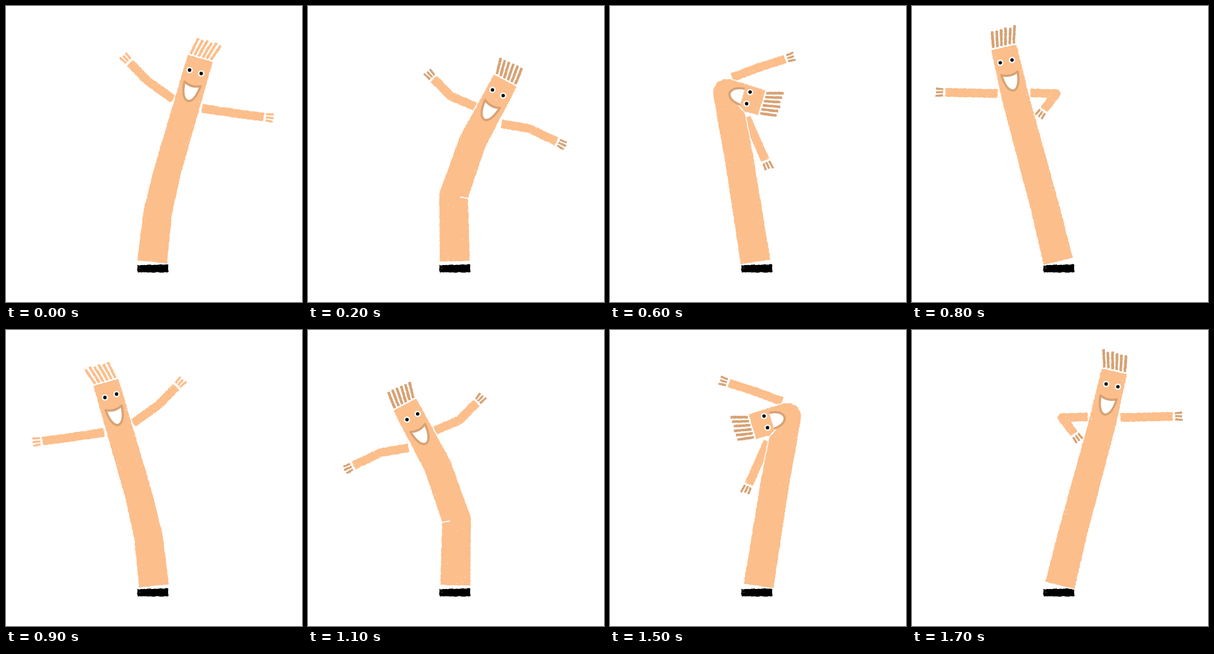
An HTML page with a canvas that plays this animation: 480 px wide and 480 px high, repeating every 1.8 s.

```html
<!DOCTYPE html>
<html lang="en">
<head>
<meta charset="utf-8">
<title>Tube dancer</title>
<style>
html, body { margin: 0; width: 100%; height: 100%; overflow: hidden; background: #fff; }
canvas { display: block; width: 100vw; height: 100vh; }
</style>
</head>
<body>
<canvas id="stage" width="480" height="480"></canvas>
<script>
const ctx = document.getElementById('stage').getContext('2d');
const SKIN = '#fcbe8b', DARK = '#d7a274';
const STEP = 100, HALF = 9, AXIS = 477;

// A pose is a spine from base to crown, two arms from shoulder to wrist,
// and the sideways sway of the hair tips.
const pose = (spine, armL, armR, sway) => ({ spine, armL, armR, sway });

const lean = pose([237,415, 246,335, 262,267, 315,85],
  [271,151, 229,121, 201,92], [318,166, 385,176, 418,180], 7);
const buckle = pose([238,414, 236,308, 267,220, 320,121],
  [271,163, 231,146, 204,118], [314,191, 360,199, 403,220], -5);
const bow = pose([237,415, 224,315, 215,222, 323,181],
  [254,178, 249,141, 214,147], [277,221, 328,238, 369,255], 1);
const droop = pose([236,415, 209,245, 189,140, 246,157],
  [198,116, 243,99, 284,86], [221,181, 237,217, 252,250], -6);
const rise = pose([237,414, 211,280, 178,150, 197,82],
  [150,136, 132,96, 112,56], [206,160, 234,186, 231,215], 0);
const stand = pose([237,414, 214,320, 168,150, 149,67],
  [139,142, 95,141, 54,140], [192,141, 234,142, 214,168], 6);

const mean = (a, b) => Array.isArray(a) ? a.map((v, i) => mean(v, b[i])) : (a + b) / 2;
const between = (a, b) =>
  pose(mean(a.spine, b.spine), mean(a.armL, b.armL), mean(a.armR, b.armR), mean(a.sway, b.sway));

const dip = { ...between(bow, droop), armL: [228,150, 238,118, 246,92] };
const poses = [lean, between(lean, buckle), buckle, between(buckle, bow), bow, dip, droop, rise, stand];

let seed = 1;
function rnd() {
  seed = (seed * 16807) % 2147483647;
  return seed / 2147483647;
}
const jit = a => (rnd() * 2 - 1) * a;
const pairs = a => Array.from({ length: a.length / 2 }, (_, i) => [a[2 * i], a[2 * i + 1]]);
const lerp = (p, q, t) => [p[0] + (q[0] - p[0]) * t, p[1] + (q[1] - p[1]) * t];
const dist = (p, q) => Math.hypot(q[0] - p[0], q[1] - p[1]);
const heading = (p, q) => Math.atan2(q[1] - p[1], q[0] - p[0]);
const move = (p, h, d) => [p[0] + Math.cos(h) * d, p[1] + Math.sin(h) * d];
const turn = (a, b) => Math.atan2(Math.sin(b - a), Math.cos(b - a));

// Local axes at the end of a limb: (side, ahead) to stage coordinates.
function frameAt(limb) {
  const [p, q] = limb.slice(-2), h = heading(p, q);
  return (side, ahead) => move(move(q, h, ahead), h + Math.PI / 2, side);
}

// Outline of a bent tube with rounded joints, tapering from w0 to w1.
function tube(pts, w0, w1) {
  const left = [], right = [], last = pts.length - 1;
  pts.forEach((p, i) => {
    const a = heading(pts[Math.max(i - 1, 0)], pts[Math.max(i, 1)]);
    const b = i < last ? heading(p, pts[i + 1]) : a;
    const r = (w0 + (w1 - w0) * i / last) / 2;
    for (let t = 0; t <= 1; t += 0.25) {
      const h = a + turn(a, b) * t + Math.PI / 2;
      left.push(move(p, h, -r));
      right.push(move(p, h, r));
    }
  });
  return [...left, ...right.reverse()];
}

// Polygon with a chalky edge; specks is the chance of a bare spot per edge sample.
function crayon(pts, color, { amp = 0.6, halo = 0, specks = 0 } = {}) {
  const path = new Path2D(), dots = [];
  pts.forEach((p, i) => {
    const q = pts[(i + 1) % pts.length], n = Math.ceil(dist(p, q) / 2);
    for (let k = 0; k < n; k++) {
      const [x, y] = lerp(p, q, k / n);
      path.lineTo(x + jit(amp), y + jit(amp));
      if (rnd() < specks) dots.push([x + jit(5), y + jit(5)]);
      if (rnd() < specks / 4) dots.push([x + jit(24), y + jit(5)]);
    }
  });
  path.closePath();
  if (halo) {
    ctx.strokeStyle = '#fff';
    ctx.lineWidth = halo;
    ctx.stroke(path);
  }
  ctx.fillStyle = color;
  ctx.fill(path);
  ctx.save();
  ctx.clip(path);
  ctx.fillStyle = 'rgba(255,255,255,.55)';
  for (const [x, y] of dots) ctx.fillRect(x, y, 0.6 + rnd(), 0.6 + rnd());
  ctx.restore();
}

const stick = (p, q, w, color) => crayon(tube([p, q], w, w), color, { amp: 0.4 });

// Fan of n strands growing from the end of a limb.
function fan(at, n, root, tip, from, to, sway, w, color) {
  for (let i = 0; i < n; i++) {
    const s = 2 * i / (n - 1) - 1;
    stick(at(s * root, from), at(s * tip + sway, to + jit(1.5)), w, color);
  }
}

function arm(flat, color) {
  const pts = pairs(flat);
  crayon(tube(pts, 14, 14), SKIN, { specks: 0.12 });
  fan(frameAt(pts), 3, 5, 6, 3.5, 16, 0, 3.4, color);
}

// White fold running in from the inner corner of every sharp bend.
function creases(pts) {
  for (let i = 1; i < pts.length - 1; i++) {
    const a = heading(pts[i - 1], pts[i]), bend = turn(a, heading(pts[i], pts[i + 1]));
    const size = Math.abs(bend);
    if (size < 0.32) continue;
    const dir = a + bend / 2 + Math.sign(bend) * Math.PI / 2;
    const corner = move(pts[i], dir, 23 / Math.cos(bend / 2));
    stick(corner, move(corner, dir, -8 - 12 * Math.min(1, size)), 1.8, '#fff');
  }
}

function disc([x, y], r, color) {
  ctx.fillStyle = color;
  ctx.beginPath();
  ctx.arc(x, y, r, 0, 7);
  ctx.fill();
}

// The mouth is squeezed when the head folds over short.
function face(at, room) {
  const chin = Math.min(72, room - 5), lip = chin * 0.6, squeezed = chin < 60;
  const path = new Path2D();
  path.moveTo(...at(13, -lip));
  path.quadraticCurveTo(...at(11, -chin * 0.97), ...at(0, -chin));
  path.quadraticCurveTo(...at(-12, -chin * 0.97), ...at(-14, -lip));
  if (!squeezed) {
    path.quadraticCurveTo(...at(0, -lip - 7), ...at(13, -lip));
    path.closePath();
  }
  ctx.fillStyle = '#fff';
  ctx.fill(path);
  ctx.strokeStyle = DARK;
  ctx.lineWidth = 3.6;
  ctx.lineJoin = 'round';
  ctx.stroke(path);
  for (const side of [-11.3, 8.3]) {
    disc(at(side, -23), 5.2, '#fff');
    disc(at(side, -23), 2.8, '#000');
  }
}

function draw(step) {
  const i = step % HALF, p = poses[i], spine = pairs(p.spine), head = frameAt(spine);
  const tint = p === lean ? SKIN : DARK;
  ctx.setTransform(1, 0, 0, 1, 0, 0);
  ctx.fillStyle = '#fff';
  ctx.fillRect(0, 0, 480, 480);

  seed = 77;
  crayon([[213, 420], [263, 419], [263.5, 432], [213, 432]], '#000', { specks: 0.04 });

  if (step >= HALF) ctx.setTransform(-1, 0, 0, 1, AXIS, 0);
  seed = 1000 + i * 313;
  arm(p.armL, tint);
  arm(p.armR, tint);
  crayon(tube(spine, 48.5, 42), SKIN, { halo: 3, specks: 0.16 });
  creases(spine);
  fan(head, 6, 17, 19, 2.5, 30, p.sway, 4.3, tint);
  face(head, dist(...spine.slice(-2)));
}

const start = performance.now();
let shown = -1;
function tick() {
  const step = Math.floor((performance.now() - start) / STEP) % (2 * HALF);
  if (step !== shown) draw(shown = step);
  requestAnimationFrame(tick);
}
tick();
</script>
</body>
</html>
```
